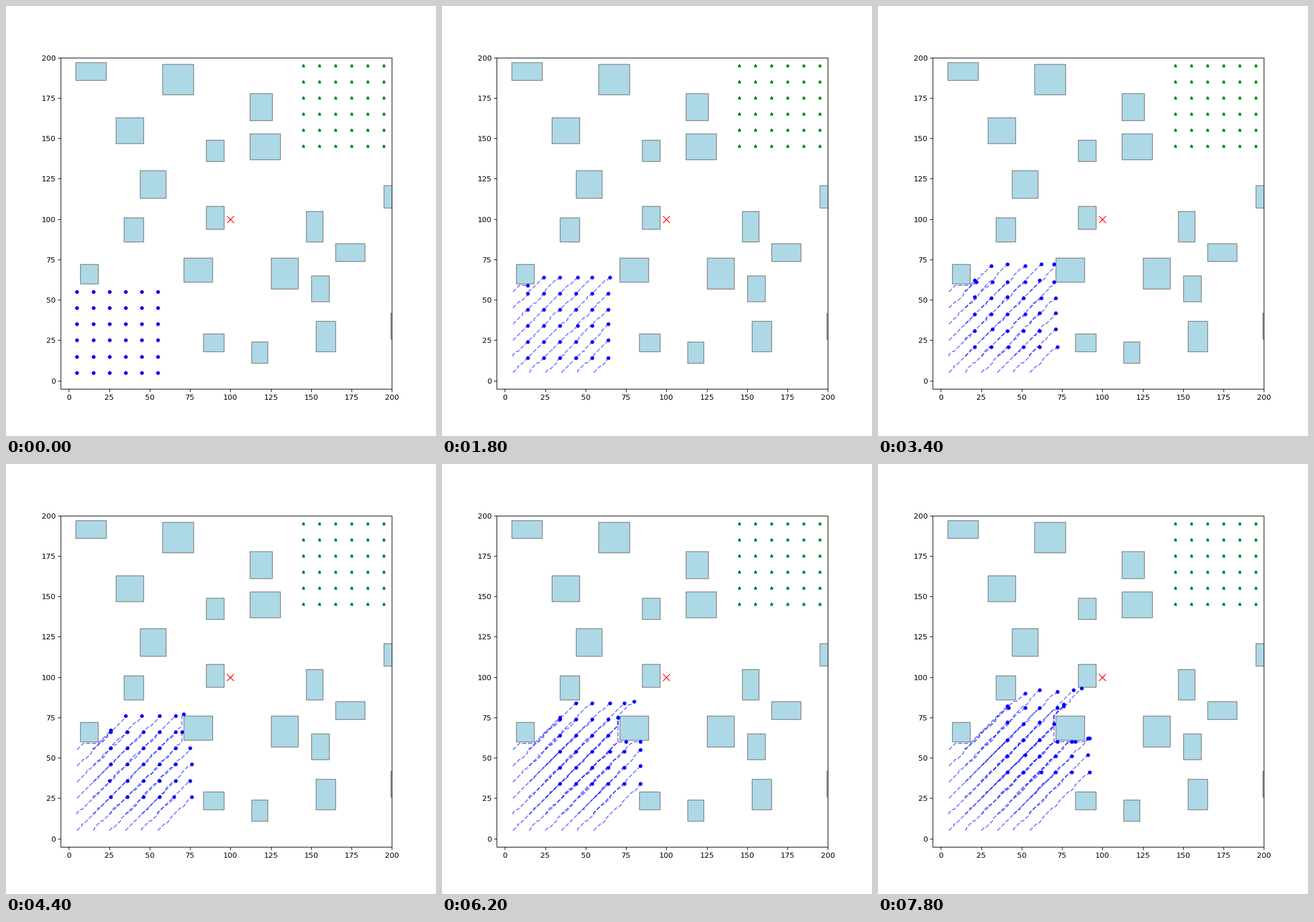
Write a matplotlib script that moves like this. It is 748 px wide and 748 px high and loops after 8000 ms.

```python
import random

import matplotlib.pyplot as plt
from matplotlib.animation import FuncAnimation
from matplotlib.patches import Rectangle

INCHES, DPI = 8, 93.5
FRAMES, INTERVAL = 40, 200
REST = 11  # each axis pauses once in this many moves

# x, y, width, height
OBSTACLES = [
    (4, 186, 19, 11), (58, 177, 19, 19), (29, 147, 17, 16), (112, 161, 14, 17),
    (85, 136, 11, 13), (112, 137, 19, 16), (44, 113, 16, 17), (195, 107, 14, 14),
    (85, 94, 11, 14), (34, 86, 12, 15), (147, 86, 10, 19), (165, 74, 18, 11),
    (7, 60, 11, 12), (71, 61, 18, 15), (125, 57, 17, 19), (150, 49, 11, 16),
    (199, 26, 13, 16), (83, 18, 13, 11), (113, 11, 10, 13), (153, 18, 12, 19),
]


def lattice(first):
    """6 x 6 points, 10 apart, row by row from the bottom."""
    return [(first + 10 * i, first + 10 * j) for j in range(6) for i in range(6)]


def blocked(x, y):
    return any(ox <= x <= ox + w and oy <= y <= oy + h for ox, oy, w, h in OBSTACLES)


def walk(start, rng):
    """Cells visited on the way to the upper right, sliding along obstacles."""
    x, y = start
    cells = [start]
    pause_x, pause_y = rng.randrange(REST), rng.randrange(REST)
    for move in range(FRAMES):
        dx = int(move % REST != pause_x)
        dy = int(move % REST != pause_y)
        if blocked(x + dx, y + dy):
            dx, dy = (1, 0) if blocked(x, y + 1) else (0, 1)
        x, y = x + dx, y + dy
        cells.append((x, y))
    return cells


rng = random.Random(4)
walks = [walk(start, rng) for start in lattice(5)]

fig, ax = plt.subplots(figsize=(INCHES, INCHES), dpi=DPI)
ax.set_aspect("equal")
ax.set_xlim(-5, 200)
ax.set_ylim(-5, 200)

for x, y, w, h in OBSTACLES:
    ax.add_patch(Rectangle((x, y), w, h, facecolor="lightblue", edgecolor="gray"))
ax.plot(*zip(*lattice(145)), "g*", markersize=4)
ax.plot(100, 100, "rx", markersize=10)

trails = [ax.plot([], [], "b--", alpha=0.5, lw=1.5)[0] for _ in walks]
dots, = ax.plot([], [], "bo", markersize=4)


def draw(frame):
    move = frame + 1 if frame else 0  # two moves in the first tick
    for trail, cells in zip(trails, walks):
        trail.set_data(*zip(*cells[:move + 1]))
    dots.set_data(*zip(*(cells[move] for cells in walks)))
    return [*trails, dots]


anim = FuncAnimation(fig, draw, frames=FRAMES, interval=INTERVAL, repeat=True,
                     repeat_delay=0, init_func=lambda: draw(0))
plt.show()
```
